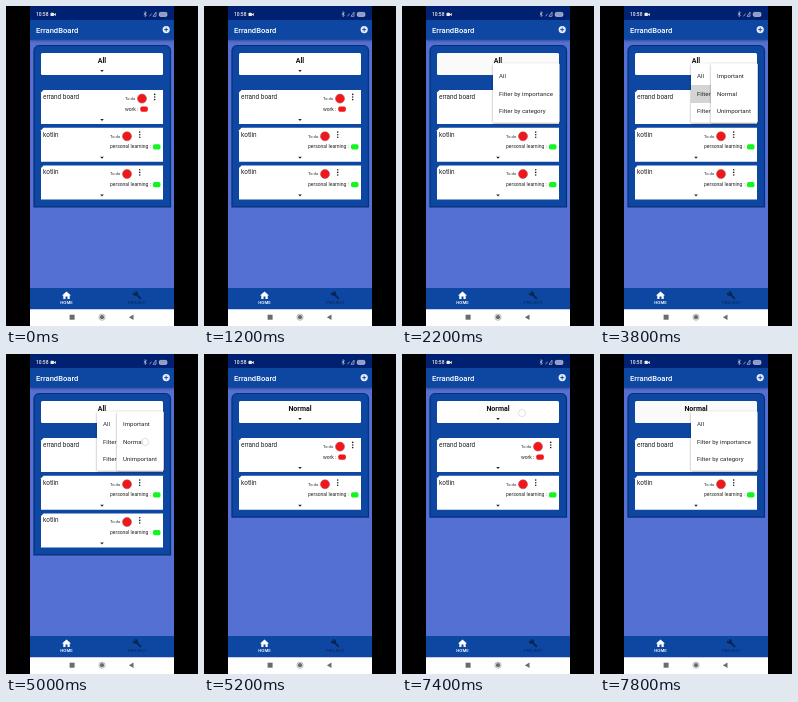
Animation of 192 by 320 pixels, one loop 8 s. Source, as an HTML page:

```html
<!DOCTYPE html>
<html lang="en">
<head>
<meta charset="utf-8">
<style>
  html, body { margin: 0; height: 100%; overflow: hidden; background: #000; }
  svg { display: block; width: 100%; height: 100%; font-family: Roboto, sans-serif; }
</style>
</head>
<body>
<svg id="stage" viewBox="0 0 192 320"></svg>
<script>
const LOOP = 8000, STEP = 200;
const BLUE = '#0d47a1', NAVY = '#002171', RED = '#f2161b', GREEN = '#12f51f';

const rect = (x, y, w, h, fill, extra = '') =>
  `<rect x="${x}" y="${y}" width="${w}" height="${h}" fill="${fill}" ${extra}/>`;
const circle = (x, y, r, fill, extra = '') =>
  `<circle cx="${x}" cy="${y}" r="${r}" fill="${fill}" ${extra}/>`;
const path = (d, fill, extra = '') => `<path d="${d}" fill="${fill}" ${extra}/>`;
// Text is placed by its vertical middle.
const text = (x, y, size, str, fill = '#222', extra = '') =>
  `<text x="${x}" y="${y + size * 0.34}" font-size="${size}" fill="${fill}" ${extra}>${str}</text>`;
const caret = y => path(`M94.2 ${y - 0.9}h3.6l-1.8 1.9z`, '#222');
const centered = 'text-anchor="middle"';

function card(y, name, x, label, color, tagX) {
  const dots = [-2.6, 0, 2.6].map(d => circle(x + 29.7, y + 7 + d, 0.8, '#222')).join('');
  return path(`M35 ${y + 34}v-31.5l2.5-2.5h119.5v34z`, '#fff')
    + text(37, y + 6.9, 6.4, name)
    + text(x, y + 8.5, 4.1, 'To do')
    + circle(x + 17, y + 8.6, 4.5, RED, 'stroke="#a9595b" stroke-width="0.6"')
    + dots
    + text(x, y + 18.9, 5, label + ' :')
    + rect(tagX, y + 16.6, 7.5, 5.2, color, 'rx="1.7"')
    + caret(y + 30);
}

function menu(id, x, items, highlight = '') {
  const rows = items.map((s, i) => text(x + 6, 70 + i * 17.6, 6.1, s)).join('');
  return `<g id="${id}"><g filter="url(#shadow)">`
    + rect(x, 57.5, 157.5 - x, 59, '#fff', 'rx="1"') + `</g>${highlight}${rows}</g>`;
}

const statusBar = rect(24, 0, 144, 14, NAVY)
  + text(30, 8.4, 4.9, '10:58', '#eee', 'font-weight="500"')
  + rect(44.5, 6.7, 3.4, 3.4, '#eee', 'rx="0.7"') + path('M47.6 8.4l2.2-1.5v3z', '#eee')
  + path('M138 6.9l2.4 2.4-1.2 1.3v-5l1.2 1.2-2.4 2.5', 'none', 'stroke="#ddd" stroke-width="0.6"')
  + path('M143.5 10.3l2-2.6M147 10.3l3-4.2v4.2z', 'none', 'stroke="#bcc6de" stroke-width="0.7"')
  + rect(153.3, 6.4, 7.6, 4, '#8d9cc4', 'rx="1.2" stroke="#dde" stroke-width="0.6"');

const appBar = rect(24, 13, 144, 20.8, BLUE, 'filter="url(#shadow)"')
  + text(30, 24.2, 7.6, 'ErrandBoard', '#fff', 'font-weight="500"')
  + circle(160.2, 23.6, 3.6, '#e8eefb')
  + path('M158.2 23.6h4M160.2 21.6v4', 'none', `stroke="${BLUE}" stroke-width="0.9"`);

const bottomBar = rect(24, 282, 144, 21.5, BLUE)
  + path('M56 289.6l4.5-4.1 4.5 4.1h-1.3v3.5h-2.2v-2.6h-2v2.6h-2.2v-3.5z', '#fff')
  + text(60.5, 296.8, 4.4, 'HOME', '#fff', centered + ' font-weight="500"')
  + path('M129.2 287.2l5.2 5.2', 'none', 'stroke="#0a2453" stroke-width="1.8" stroke-linecap="round"')
  + path('M127.2 286.5l1.6 1.5 1.3-1.6-1.3-1.3q3-.4 3.3 2.5t-3 2.2-1.9-3.3z', '#0a2453')
  + text(131.5, 296.8, 4.4, 'PROJECT', '#0a2d69', centered + ' font-weight="500"')
  + rect(24, 303.3, 144, 16.7, '#fff')
  + rect(63.6, 308.7, 5, 5, '#6b6b6b')
  + circle(96, 311.2, 2.1, '#6b6b6b')
  + circle(96, 311.2, 3.1, 'none', 'stroke="#8a8a8a" stroke-width="0.6"')
  + path('M127.5 308.4v5.6l-4.6-2.8z', '#6b6b6b');

const stage = document.getElementById('stage');
stage.innerHTML = `<defs>
    <filter id="shadow" x="-20%" y="-20%" width="140%" height="140%">
      <feDropShadow dx="0" dy="0.8" stdDeviation="1" flood-opacity="0.4"/></filter>
    <clipPath id="field">${rect(35, 47, 122, 22, '#fff', 'rx="1.5"')}</clipPath>
    <clipPath id="phone">${rect(24, 0, 144, 320, '#fff')}</clipPath>
  </defs><g clip-path="url(#phone)">`
  + rect(24, 0, 144, 320, '#5470d2') + appBar + statusBar
  + `<path id="panel" fill="${BLUE}" stroke="#082f78" stroke-width="1.2"/>`
  + rect(35, 47, 122, 22, '#fff', 'rx="1.5"')
  + `<g clip-path="url(#field)">${circle(96, 58, 1, '#777', 'id="ripple"')}</g>`
  + text(96, 54.2, 7, 'All', '#111', centered + ' font-weight="700" id="choice"')
  + caret(65)
  + card(84, 'errand board', 119, 'work', RED, 134.3)
  + card(121.7, 'kotlin', 104, 'personal learning', GREEN, 147)
  + `<g id="third">${card(159.4, 'kotlin', 104, 'personal learning', GREEN, 147)}</g>`
  + menu('mainMenu', 91, ['All', 'Filter by importance', 'Filter by category'],
      rect(91, 79, 66.5, 18, '#888', 'id="pressed"'))
  + menu('subMenu', 111, ['Important', 'Normal', 'Unimportant'])
  + circle(0, 0, 3.6, '#fff', 'id="touch" fill-opacity="0.75" stroke="#ccc" stroke-width="0.6"')
  + bottomBar + '</g>';

const el = id => document.getElementById(id);
const set = (id, attrs) => {
  for (const key in attrs) el(id).setAttribute(key, attrs[key]);
};
const ramp = (t, from, to) => Math.min(1, Math.max(0, (t - from) / (to - from)));
const pulse = (t, a, b, c, d) => ramp(t, a, b) * (1 - ramp(t, c, d));

const taps = [
  { from: 1800, to: 2100, x: 120, y: 59 },
  { from: 3400, to: 3700, x: 135, y: 88 },
  { from: 4800, to: 5100, x: 139, y: 88 },
  { from: 7400, to: 7700, x: 120, y: 59 }
];

function draw(t) {
  const filtered = t >= 5200;
  const opened = filtered ? 7400 : 1800;
  const bottom = filtered ? 163.1 : 200.9;

  el('choice').textContent = filtered ? 'Normal' : 'All';
  set('third', { opacity: filtered ? 0 : 1 });
  set('panel', { d: `M28 ${bottom}V44.5q.5-4.5 5-5h126.5q4.5.5 5 5V${bottom}z` });

  set('ripple', {
    r: 80 * ramp(t, opened - 100, opened + 300),
    opacity: 0.04 * pulse(t, opened - 100, opened + 100, opened + 400, opened + 800)
  });
  set('mainMenu', { opacity: filtered ? ramp(t, 7500, 7700) : pulse(t, 1900, 2100, 5050, 5200) });
  set('pressed', { opacity: 0.36 * pulse(t, 3300, 3500, 3800, 4100) });
  set('subMenu', { opacity: pulse(t, 3500, 3700, 5050, 5200) });

  const tap = taps.find(p => t >= p.from && t < p.to);
  set('touch', tap ? { cx: tap.x, cy: tap.y, opacity: 1 } : { opacity: 0 });
}

const start = performance.now();
function tick() {
  const t = (performance.now() - start) % LOOP;
  draw(Math.floor(t / STEP) * STEP);
  requestAnimationFrame(tick);
}
tick();
</script>
</body>
</html>
```
